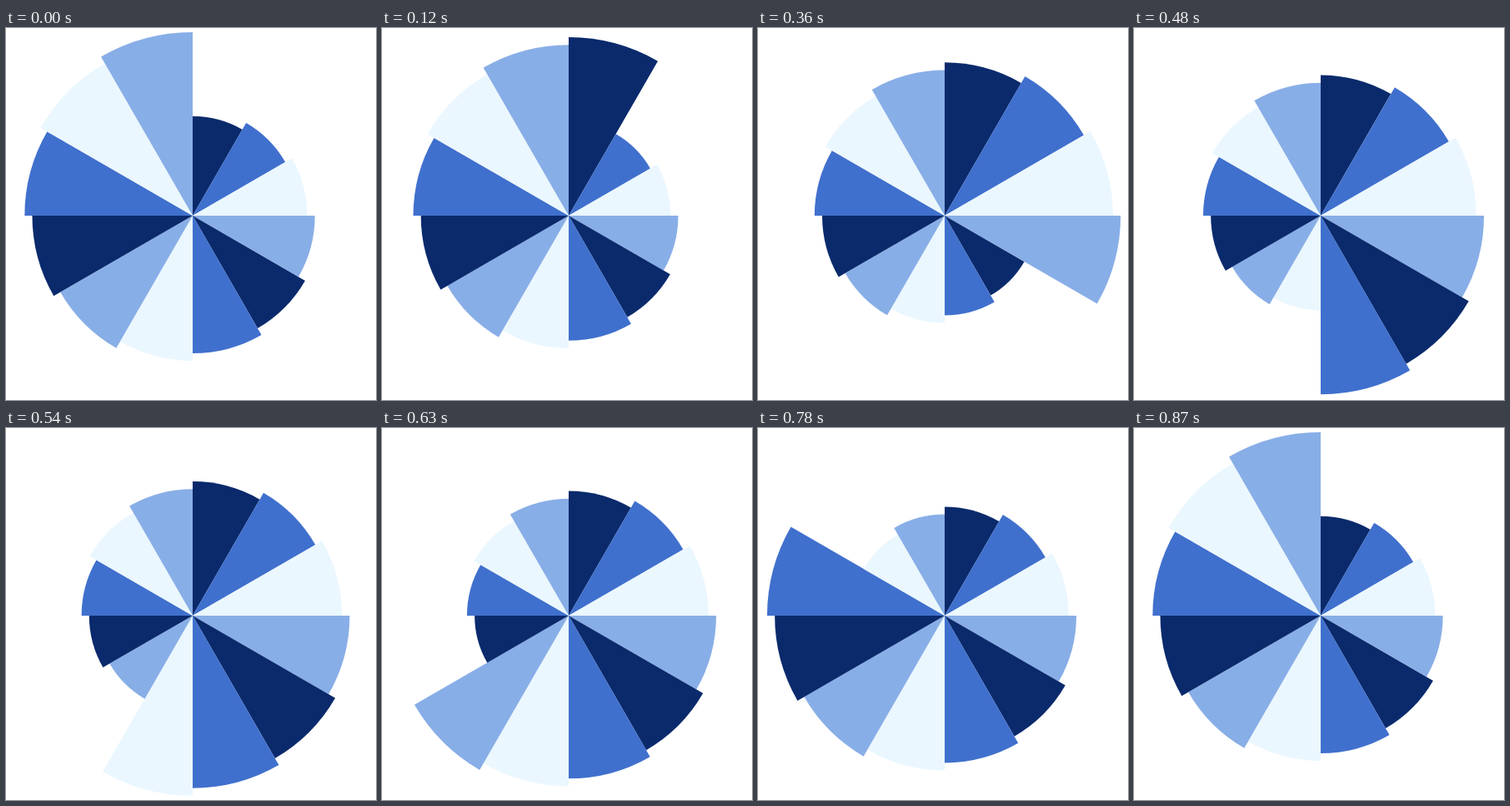
These frames come from a looping animation (444x446 px, 900 ms). An HTML page with a canvas:

```html
<!DOCTYPE html>
<html lang="en">
<head>
<meta charset="utf-8">
<title>Spiral fan loader</title>
<style>
  html, body { margin: 0; width: 100%; height: 100%; overflow: hidden; background: #fff; }
  canvas { display: block; }
</style>
</head>
<body>
<canvas id="stage" width="444" height="446"></canvas>
<script>
  const ctx = document.getElementById('stage').getContext('2d');
  const COLORS = ['#0a2a6c', '#4070cd', '#ebf7ff', '#88aee7'];
  const WEDGES = 12;
  const STEP = 30;      // ms per pose
  const LOOP = 900;     // ms
  const POSES = 29;     // the first pose is held for one extra step
  const CX = 224, CY = 225;
  const INNER = 110, GROWTH = 110;

  // Each wedge shrinks linearly, then snaps back to full size.
  function radius(i, pose) {
    const q = (i + 1) / WEDGES - pose / POSES;
    return INNER + GROWTH * (q - Math.ceil(q) + 1);
  }

  function draw(time) {
    const pose = Math.floor((time % LOOP) / STEP + 1e-6) % POSES;
    const angle = 2 * Math.PI / WEDGES;
    ctx.fillStyle = '#fff';
    ctx.fillRect(0, 0, 444, 446);
    for (let i = 0; i < WEDGES; i++) {
      const start = i * angle - Math.PI / 2;
      ctx.beginPath();
      ctx.moveTo(CX, CY);
      ctx.arc(CX, CY, radius(i, pose), start, start + angle);
      ctx.closePath();
      ctx.fillStyle = COLORS[i % COLORS.length];
      ctx.fill();
    }
  }

  const t0 = performance.now();
  function tick() {
    draw(performance.now() - t0);
    requestAnimationFrame(tick);
  }
  tick();
</script>
</body>
</html>
```
